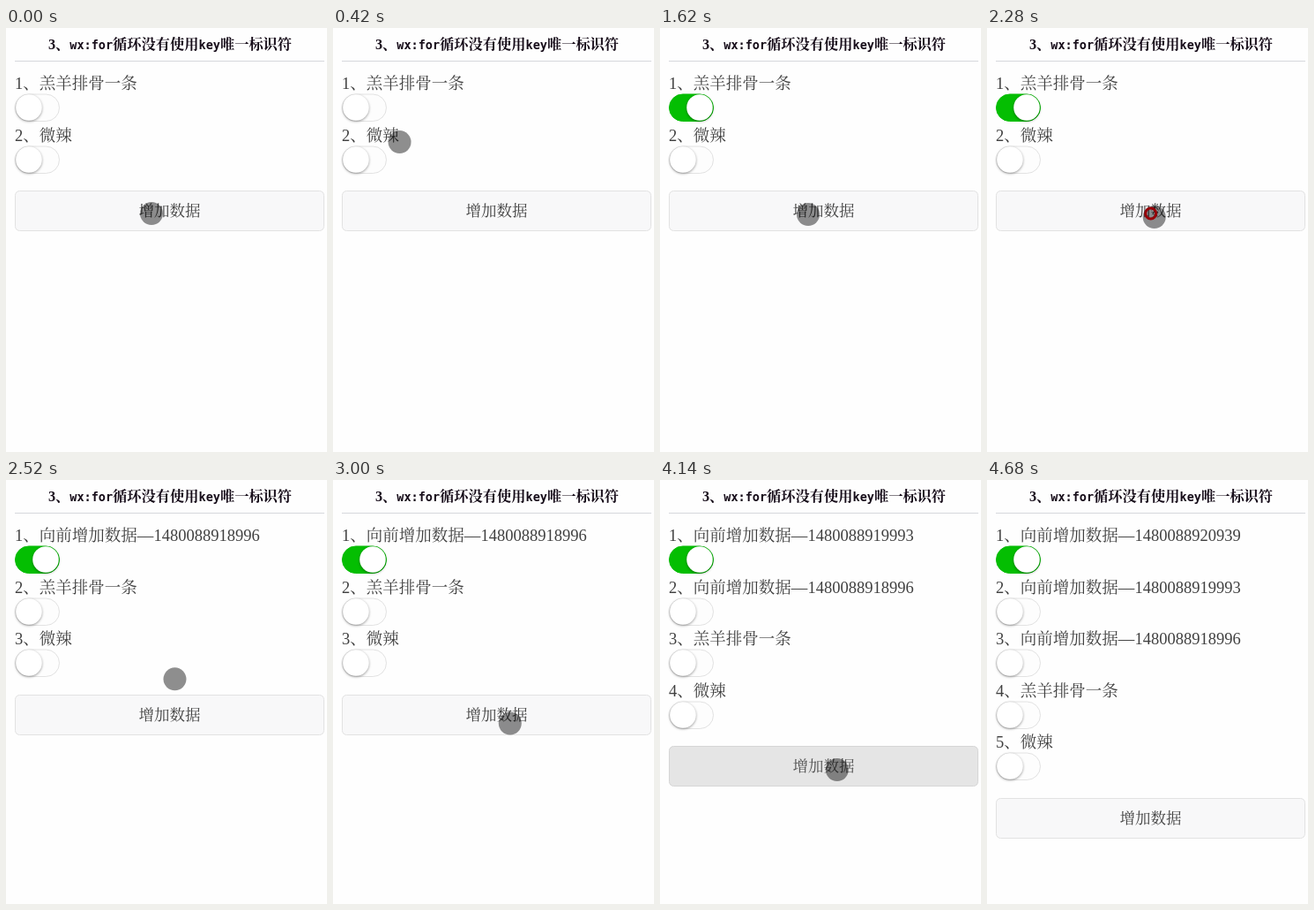
These frames come from a looping animation (364x480 px, 5400 ms). An HTML page with a canvas:

```html
<!DOCTYPE html>
<html lang="zh">
<head>
<meta charset="utf-8">
<title>wx:for</title>
<style>
html, body { margin: 0; width: 100%; height: 100%; overflow: hidden; background: #fefefe; }
canvas { display: block; width: 364px; height: 480px; }
</style>
</head>
<body>
<canvas id="stage"></canvas>
<script>
const W = 364, H = 480, LOOP = 5400, STEP = 60;
const ROW = 58.6;
const canvas = document.getElementById('stage');
const ctx = canvas.getContext('2d');
const ratio = window.devicePixelRatio || 1;
canvas.width = W * ratio;
canvas.height = H * ratio;

const CJK = '"Noto Serif CJK SC", "Noto Sans CJK SC", "Noto Sans CJK", sans-serif';
const SERIF = '"Liberation Serif", serif';
const LATIN = '"DejaVu Sans Mono", monospace';

const base = ['羔羊排骨一条', '微辣'];
const added = [
  { at: 2340, label: '向前增加数据--1480088918996' },
  { at: 3300, label: '向前增加数据--1480088919993' },
  { at: 4200, label: '向前增加数据--1480088920939' }
];
const presses = [[2340, 2460], [3240, 3480], [4080, 4260]];
const toggleAt = 1140, toggleTime = 300;
const ringFrom = 2280, ringTo = 2340;

// Pointer stops: time, x, y
const path = [
  [0, 165, 210], [540, 50, 106], [720, 50, 106], [900, 33.5, 93],
  [1200, 33.5, 93], [1620, 168, 211], [1680, 168, 211], [1980, 189.7, 214],
  [2460, 189.7, 214], [2640, 195, 248], [2820, 195, 248], [3000, 200.8, 275.5],
  [3720, 200.8, 275.5], [4020, 200.8, 328], [4260, 200.8, 328], [4680, 206, 500]
];

const clamp = v => Math.max(0, Math.min(1, v));
const ease = v => v * v * (3 - 2 * v);

function pointerAt(t) {
  const i = path.findIndex(p => p[0] > t);
  if (i < 0) return null;
  const [t0, x0, y0] = path[i - 1], [t1, x1, y1] = path[i];
  const k = (t - t0) / (t1 - t0);
  return [x0 + (x1 - x0) * k, y0 + (y1 - y0) * k];
}

// Half-width runs use faces whose advance is half of the CJK size;
// the serif en dash fills its half cell like a monospaced hyphen.
function runsOf(text, size, weight) {
  const parts = text.replace(/-/g, '–').match(/[\d–]+|[!-\/:-~]+|[^!-~–]+/g);
  return parts.map(part => {
    const font = /[\d–]/.test(part) ? `${weight} ${size}px ${SERIF}`
      : /[!-~]/.test(part) ? `${weight} ${size * 5 / 6}px ${LATIN}`
      : `${weight} ${size}px ${CJK}`;
    ctx.font = font;
    return { part, font, width: ctx.measureText(part).width };
  });
}

function write(text, x, y, size, color, weight = 400, centered = false) {
  const runs = runsOf(text, size, weight);
  if (centered) x -= runs.reduce((sum, r) => sum + r.width, 0) / 2;
  ctx.fillStyle = color;
  for (const r of runs) {
    ctx.font = r.font;
    ctx.fillText(r.part, x, y);
    x += r.width;
  }
}

function box(x, y, w, h, radius, fill, stroke) {
  ctx.beginPath();
  ctx.roundRect(x, y, w, h, radius);
  ctx.fillStyle = fill;
  ctx.fill();
  ctx.strokeStyle = stroke;
  ctx.lineWidth = 1;
  ctx.stroke();
}

function disc(x, y, r, fill) {
  ctx.beginPath();
  ctx.arc(x, y, r, 0, Math.PI * 2);
  ctx.fillStyle = fill;
  ctx.fill();
}

function drawSwitch(y, on) {
  const x = 10.5;
  box(x, y, 50, 30.5, 15.25, '#fdfdfd', '#e2e2e2');
  if (on > 0) {
    ctx.globalAlpha = on;
    box(x, y, 50, 30.5, 15.25, '#04be02', '#04be02');
    ctx.globalAlpha = 1;
  }
  ctx.save();
  ctx.shadowColor = 'rgba(0,0,0,.4)';
  ctx.shadowBlur = 3 * ratio;
  ctx.shadowOffsetY = ratio;
  disc(26 + 19 * on, y + 15, 14.8, '#fff');
  ctx.restore();
}

function draw(t) {
  ctx.setTransform(ratio, 0, 0, ratio, 0, 0);
  ctx.fillStyle = '#fefefe';
  ctx.fillRect(0, 0, W, H);

  write('3、wx:for循环没有使用key唯一标识符', 186, 23.5, 16.24, '#150b18', 700, true);
  ctx.fillStyle = '#d6d8dc';
  ctx.fillRect(10, 37, 351, 1);

  const fresh = added.filter(a => t >= a.at).map(a => a.label).reverse();
  const rows = fresh.concat(base);
  const on = ease(clamp((t - toggleAt) / toggleTime));
  rows.forEach((label, i) => {
    const y = i * ROW;
    write(`${i + 1}、${label}`, 10, 69 + y, 18.53, '#404040');
    drawSwitch(Math.round(75 + y), i ? 0 : on);
  });

  const top = Math.round(184 + (rows.length - 2) * ROW) + 0.5;
  const pressed = presses.some(([from, to]) => t >= from && t < to);
  box(10.5, top, 350, 45, 5, pressed ? '#e5e5e5' : '#f8f8f9', pressed ? '#d6d6d6' : '#e2e2e2');
  write('增加数据', 185.5, top + 28.5, 17.5, pressed ? '#505050' : '#404040', 400, true);

  const pointer = pointerAt(t);
  if (pointer) disc(pointer[0], pointer[1], 13, 'rgba(0,0,0,.44)');
  if (pointer && t >= ringFrom && t < ringTo) {
    ctx.beginPath();
    ctx.arc(pointer[0] - 4, pointer[1] - 4, 6, 0, Math.PI * 2);
    ctx.strokeStyle = '#960008';
    ctx.lineWidth = 3;
    ctx.stroke();
  }
}

const start = performance.now();
function tick() {
  const t = (performance.now() - start) % LOOP;
  draw(Math.floor(t / STEP) * STEP);
  requestAnimationFrame(tick);
}
tick();
</script>
</body>
</html>
```
